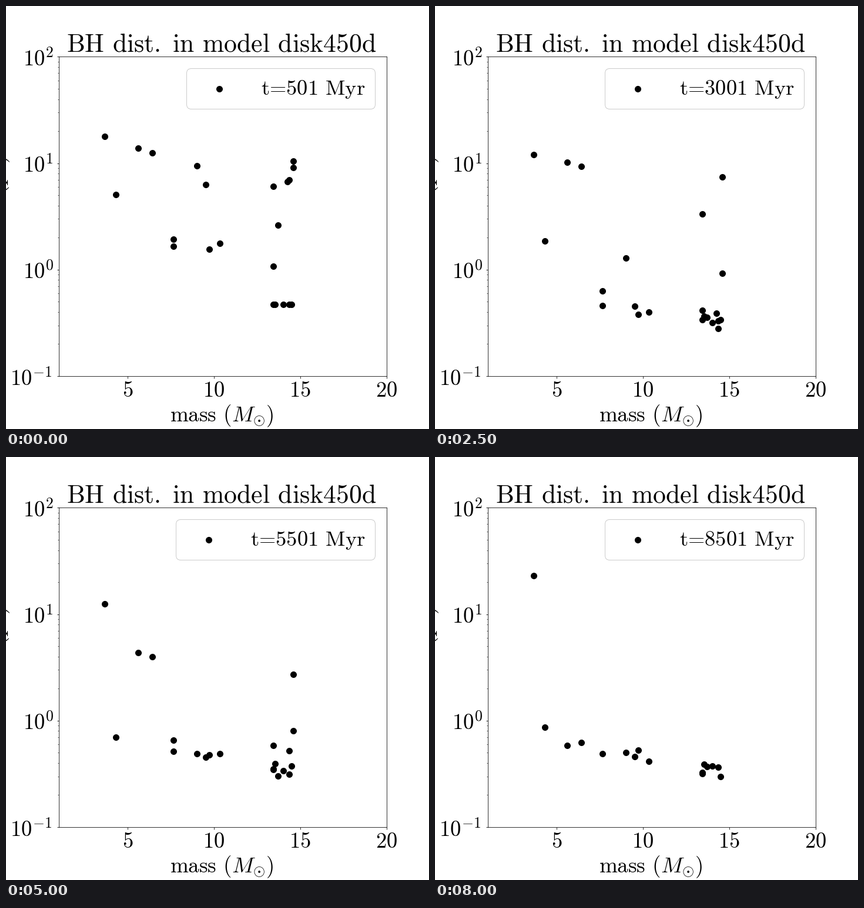
Animation, 720 px wide and 720 px high, one loop 8.5 s. Source, as a matplotlib script:

```python
import numpy as np
import matplotlib.pyplot as plt
from matplotlib.animation import FuncAnimation
from matplotlib.lines import Line2D
from matplotlib.patches import FancyBboxPatch
from matplotlib.transforms import Affine2D

plt.rcParams["mathtext.fontset"] = "cm"

SIZE = 720
STEPS = 17
LABEL, TITLE = 36.7, 43.7
SCATTER = 8

fig = plt.figure(figsize=(SIZE / 72, SIZE / 72), dpi=72, facecolor="white")
# Stage pixels, y pointing down.
pixels = Affine2D().scale(1, -1).translate(0, SIZE)


# --- drawing helpers ---

def roman(text):
    """Upright Computer Modern with text spacing instead of math spacing."""
    text = text.replace(". ", r".\hspace{0.31}").replace(" ", r"\hspace{0.38}")
    text = text.replace("=", r"\hspace{-0.2}=\hspace{-0.2}")
    return r"$\mathrm{" + text + "}$"


def write(x, y, text, size=LABEL, ha="center", va="baseline", rotation=0):
    return fig.text(x, y, text, fontsize=size, ha=ha, va=va,
                    rotation=rotation, color="black", transform=pixels)


def dots():
    return fig.add_artist(Line2D([], [], ls="none", marker="o", ms=10,
                                 color="black", transform=pixels, zorder=2))


# --- motion: every object sinks to a core whose depth grows with mass ---

def sinker(x, start, duration, first=0, last=STEPS - 1):
    return x, start, duration, first, last


OBJECTS = [
    # light
    sinker(187, 321, 7),
    sinker(225, 242, 16),
    sinker(249, 250, 16),
    sinker(285, 397, 2),
    sinker(285, 409, 2, last=10),
    sinker(325, 272, 6),
    sinker(340, 304, 4.5),
    sinker(346, 414, 2),
    sinker(364, 404, 2),
    # heavy, still outside the core at the start
    sinker(455, 307, 11, last=10),
    sinker(455, 443, 2),
    sinker(463, 373, 2, last=11),
    sinker(479, 299, 2, last=6),
    sinker(482, 296, 4, last=6),
    sinker(489, 264, 16, last=14),
    sinker(489, 275, 6, last=9),
    # kicked out again
    sinker(482, 261, 3.3, first=7, last=10),
    sinker(489, 466, 2, first=10, last=10),
    sinker(463, 399, 3, first=12),
    # short-lived mergers
    sinker(505, 545, 2, first=7, last=7),
    sinker(584, 568, 2, first=9, last=9),
    sinker(509, 507, 2, first=11, last=12),
]
# heavy, in the core from the start
OBJECTS += [sinker(x, 508, 2) for x in (455, 458, 472, 482, 486)]

noise = np.random.default_rng(4).normal(0, SCATTER, (len(OBJECTS), STEPS))


def positions(step):
    # The lightest object drifts inwards and back out.
    points = [(168, 222 + 9.6 * step - 0.68 * step ** 2)]
    for (x, start, duration, first, last), wobble in zip(OBJECTS, noise):
        if first <= step <= last:
            sunk = min(1, ((step - first) / duration) ** 2)
            core = 437 + 0.205 * x + wobble[step]
            points.append((x, start + (core - start) * sunk))
    return np.round(points).T


# --- fixed parts ---

ax = fig.add_axes([0.125, 0.125, 0.775, 0.755])
ax.set_xlim(1, 20)
ax.set_yscale("log")
ax.set_ylim(0.1, 100)
ax.set_xticks([5, 10, 15, 20])
ax.tick_params(which="both", labelbottom=False, labelleft=False)

write(367, 77, roman("BH dist. in model disk450d"), TITLE)
write(367.5, 707, r"$\mathrm{mass\hspace{0.38}(}M_{\odot}\mathrm{)}$", 37)
write(9, 361, roman("distance (pc)"), 38, ha="right", va="center", rotation=90)
for mass in (5, 10, 15, 20):
    write(89.5 + (mass - 1) * 558 / 19, 665, roman(str(mass)))
for power in range(-1, 3):
    y = 645.5 - (power + 1) * 181.2
    write(7 if power < 0 else 29, y, "$10^{%d}$" % power, ha="left")

legend_box = fig.add_artist(FancyBboxPatch(
    (289.5, 106.5), 339, 69, boxstyle="round,pad=0,rounding_size=8",
    fc="white", ec="0.8", lw=1, transform=pixels, zorder=1))
legend_dot = dots()
legend_text = write(416, 151, "", 36.5, ha="left")
cloud = dots()


def update(step):
    cloud.set_data(*positions(step))
    age = 501 + 500 * step
    left = 307.5 if age < 1000 else 289.5
    legend_box.set_bounds(left, 106.5, 628.5 - left, 69)
    legend_dot.set_data([left + 55.5], [141])
    legend_text.set_x(left + 127)
    legend_text.set_text(roman(f"t={age} Myr"))
    return cloud, legend_box, legend_dot, legend_text


anim = FuncAnimation(fig, update, frames=STEPS, interval=500, repeat=True,
                     repeat_delay=0)
plt.show()
```
